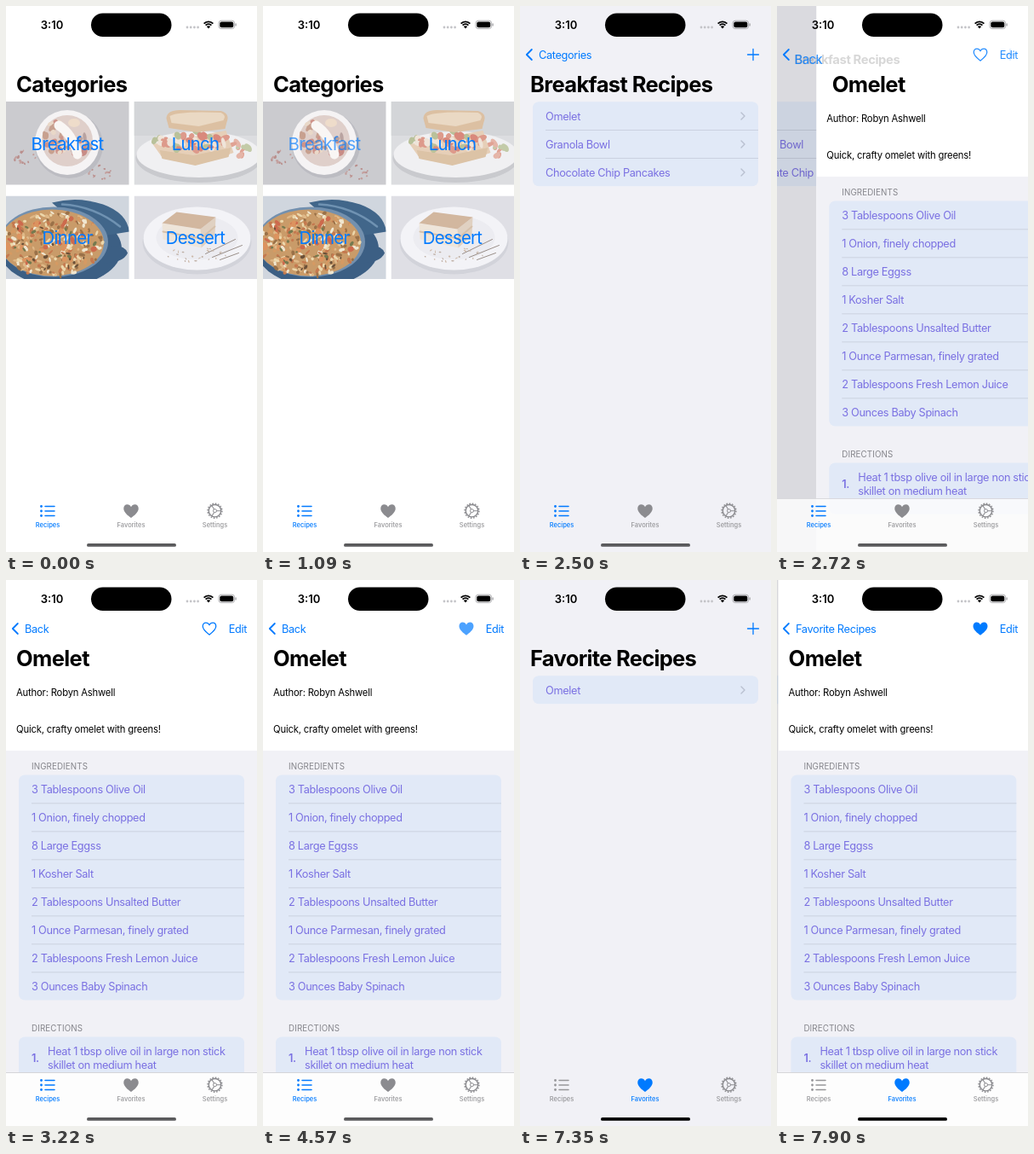
Write an HTML page with a canvas that moves like this. It is 295 by 640 pixels and loops after 8 s.

```html
<!DOCTYPE html>
<html lang="en">
<head>
<meta charset="utf-8">
<title>Recipe app</title>
<style>
html, body { margin: 0; width: 100%; height: 100%; overflow: hidden; background: #fff; }
canvas { display: block; }
</style>
</head>
<body>
<canvas id="stage" width="295" height="640"></canvas>
<script>
const c = document.getElementById('stage').getContext('2d');
const W = 295, H = 640, LOOP = 8000;
const BLUE = '#007aff', GREY = '#969699', PURPLE = '#7a70e2', PAPER = '#f1f1f6', CELL = '#e1e9f7';
const mix = (a, b, p) => a + (b - a) * p;

// ---- drawing helpers ----
function text(s, x, y, size, color, { weight = 400, align = 'left', track = -0.027 } = {}) {
  c.font = `${weight} ${size}px Inter, sans-serif`;
  c.letterSpacing = track * size + 'px';
  c.textAlign = align;
  c.fillStyle = color;
  c.fillText(s, x, y + size * 0.364);
}
function rect(x, y, w, h, color, radius = 0) {
  c.fillStyle = color;
  c.beginPath();
  c.roundRect(x, y, w, h, radius);
  c.fill();
}
function oval(x, y, rx, ry, color, turn = 0) {
  c.fillStyle = color;
  c.beginPath();
  c.ellipse(x, y, rx, ry, turn, 0, 7);
  c.fill();
}
function shape(d, color) {
  c.fillStyle = color;
  c.fill(new Path2D(d));
}
function line(d, color, width) {
  c.strokeStyle = color;
  c.lineWidth = width;
  c.lineCap = c.lineJoin = 'round';
  c.stroke(new Path2D(d));
}
function faded(alpha, draw) {
  if (alpha <= 0) return;
  c.save();
  c.globalAlpha *= Math.min(1, alpha);
  draw();
  c.restore();
}
function shifted(x, y, draw) {
  c.save();
  c.translate(x, y);
  draw();
  c.restore();
}
function random(seed) {
  return () => (seed = seed * 16807 % 2147483647) / 2147483647;
}
// Scatters small ovals inside an ellipse.
function scatter(seed, count, x, y, rx, ry, size, colors) {
  const rnd = random(seed);
  for (let i = 0; i < count; i++) {
    const a = rnd() * 6.283, r = Math.sqrt(rnd());
    oval(x + Math.cos(a) * r * rx, y + Math.sin(a) * r * ry,
      size * (0.6 + rnd()), size * (0.4 + rnd() * 0.5), colors[i % colors.length], rnd() * 3);
  }
}

// ---- food tiles, each 144.5 x 97.5 ----
function breakfast() {
  rect(0, 0, 145, 98, '#cbcbcf');
  scatter(7, 16, 22, 66, 13, 9, 1.6, ['#c3a09e', '#b98f8d']);
  scatter(17, 14, 112, 83, 15, 9, 1.6, ['#c3a09e', '#b98f8d']);
  oval(74, 51, 40, 39, '#bcbcc2');
  oval(72, 48, 38, 38, '#f5f3f4');
  oval(72, 46, 30, 30, '#dfcfca');
  scatter(31, 24, 61, 42, 16, 20, 4, ['#ce938a', '#e9d8c8', '#c7a08f']);
  scatter(41, 12, 88, 54, 10, 14, 4, ['#c88c86', '#b9a3a0']);
  line('M62 28Q78 38 84 62', '#f9f6f4', 11);
  oval(80, 25, 7, 5, '#eedcca');
}
function lunch() {
  rect(0, 0, 145, 98, '#dcdde0');
  rect(0, 0, 145, 40, '#d3d5d8');
  oval(76, 66, 74, 29, '#c9cace');
  oval(76, 62, 73, 27, '#f0f0f2');
  scatter(9, 12, 122, 56, 15, 8, 4, ['#e0a294', '#c3cba8', '#e5b5a8']);
  shape('M22 50L108 34L117 60L88 70L32 64Z', '#e6cfb8');
  scatter(5, 46, 68, 46, 46, 11, 4.5, ['#dd9a8b', '#efe4d9', '#b9c19a', '#d9897c']);
  shape('M38 20Q38 10 54 10L102 11Q113 14 109 24L107 32L74 36L41 31Z', '#dcc0a2');
  shape('M42 17Q52 11 102 13Q109 16 105 22L76 29L44 25Z', '#ead9c4');
  shape('M30 57L70 63L114 54L111 65L72 75L33 67Z', '#dcc3a6');
}
function dinner() {
  rect(0, 0, 145, 98, '#d0d6de');
  oval(64, 62, 72, 44, '#3c5f84');
  shape('M54 8Q84 0 114 10Q142 20 145 42L120 46L72 24Z', '#41668a');
  line('M66 10Q104 12 134 36', '#6f92b2', 2.5);
  shape('M112 60Q139 55 143 67Q138 79 112 79Z', '#3c5f84');
  oval(56, 54, 64, 41, '#7390ae');
  oval(54, 55, 61, 39, '#c99b69');
  scatter(11, 260, 54, 56, 60, 38, 2.4, ['#dfb887', '#c5794f', '#ecd7ab', '#9a7148', '#d59a63', '#f0e6cf']);
  scatter(23, 24, 54, 55, 54, 32, 3.8, ['#cd6a4d', '#dc935f']);
  scatter(37, 30, 54, 56, 54, 33, 2, ['#757a4f', '#6a5038']);
}
function dessert() {
  rect(0, 0, 145, 98, '#dfdfe5');
  oval(74, 54, 64, 38, '#d2d3da');
  oval(74, 50, 63, 37, '#f3f3f7');
  oval(74, 49, 48, 26, '#ececf1');
  shape('M33 32L78 39L79 61L34 51Z', '#eee5da');
  shape('M78 39L96 25L95 46L79 61Z', '#e0d1c2');
  shape('M33 32L50 19L96 25L78 39Z', '#d2b79f');
  line('M34 42L79 50L95 36', '#d6c1ac', 2);
  line('M84 68L119 51M92 72L127 58M101 75L123 67', '#9a8f89', 1);
  scatter(53, 22, 72, 70, 36, 10, 1.2, ['#bdaea3', '#cdbaab']);
}
function tile(x, y, label, draw, strength = 1) {
  shifted(x, y, () => {
    c.beginPath();
    c.rect(0, 0, 144.5, 97.5);
    c.clip();
    draw();
    faded(strength, () => text(label, 72, 49.2, 20.4, BLUE, { align: 'center', track: -0.036 }));
  });
}

// ---- pages ----
function list(y, rows, arrows) {
  rect(15, y, 265, rows.length * 33, CELL, 7);
  rows.forEach((row, i) => {
    const mid = y + 33 * i + 16.8;
    text(row, 30, mid, 12.75, PURPLE);
    if (i) rect(30, y + 33 * i, 250, 0.7, '#c3cad8');
    if (arrows) line(`M260 ${mid - 4}l4 4l-4 4`, '#b9c0d0', 1.4);
  });
}
function recipe() {
  rect(0, 200, W, H, PAPER);
  const note = (s, y) => text(s, 12, y, 11.25, '#000', { track: -0.016 });
  note('Author: Robyn Ashwell', 131.5);
  note('Quick, crafty omelet with greens!', 175);
  const caption = (s, y) => text(s, 30, y, 9.75, '#85858b', { track: 0.012 });
  caption('INGREDIENTS', 218.5);
  list(228.5, ['3 Tablespoons Olive Oil', '1 Onion, finely chopped', '8 Large Eggss', '1 Kosher Salt',
    '2 Tablespoons Unsalted Butter', '1 Ounce Parmesan, finely grated',
    '2 Tablespoons Fresh Lemon Juice', '3 Ounces Baby Spinach']);
  caption('DIRECTIONS', 525);
  rect(15, 535.5, 265, 60, CELL, 7);
  text('1.', 30, 560, 12.75, PURPLE, { weight: 600 });
  text('Heat 1 tbsp olive oil in large non stick', 49, 552, 12.75, PURPLE);
  text('skillet on medium heat', 49, 568, 12.75, PURPLE);
}
const categories = {
  title: 'Categories', paper: '#fff',
  body(t) {
    tile(0, 112, 'Breakfast', breakfast, t < 1090 ? 1 : 0.65);
    tile(150.5, 112, 'Lunch', lunch);
    tile(0, 222.5, 'Dinner', dinner);
    tile(150.5, 222.5, 'Dessert', dessert);
  }
};
const recipes = {
  title: 'Breakfast Recipes', back: 'Categories', paper: PAPER, buttons: plus,
  body: () => list(112.3, ['Omelet', 'Granola Bowl', 'Chocolate Chip Pancakes'], true)
};
const favorites = {
  title: 'Favorite Recipes', paper: PAPER, buttons: plus,
  body: () => list(112.3, ['Omelet'], true)
};
const omelet = { title: 'Omelet', back: 'Back', paper: '#fff', bar: true, buttons: likeAndEdit, body: recipe };
const likedOmelet = { ...omelet, back: 'Favorite Recipes' };

// ---- icons and bars ----
const HEART = new Path2D('M0 .46C-.2 .31-.5 .1-.5-.17C-.5-.34-.39-.44-.26-.44C-.14-.44-.05-.37 0-.27' +
  'C.05-.37 .14-.44 .26-.44C.39-.44 .5-.34 .5-.17C.5 .1 .2 .31 0 .46Z');
function heart(x, y, size, color, filled = true) {
  shifted(x, y, () => {
    c.scale(size, size);
    c.fillStyle = c.strokeStyle = color;
    c.lineWidth = 1.3 / size;
    c.lineJoin = 'round';
    filled ? c.fill(HEART) : c.stroke(HEART);
  });
}
function plus() {
  line('M267.5 57h13M274 50.5v13', BLUE, 1.3);
}
function likeAndEdit(t) {
  const liked = t >= 4450;
  const pressed = t >= 4230 && t < 4670;
  faded(!pressed ? 1 : liked ? 0.7 : 0.4, () => heart(239, 57, liked ? 17 : 15.5, BLUE, liked));
  text('Edit', 283, 57, 12.75, BLUE, { align: 'right' });
}
function gear(x, y, color) {
  c.strokeStyle = color;
  const ring = (r, width) => {
    c.lineWidth = width;
    c.beginPath();
    c.arc(x, y, r, 0, Math.PI * 2);
    c.stroke();
  };
  c.lineCap = 'butt';
  const tooth = Math.PI * 2 * 8.5 / 32;
  c.setLineDash([tooth, tooth]);
  ring(8.5, 1.4);
  c.setLineDash([]);
  ring(7.2, 1.4);
  ring(2, 1);
  line(`M${x + 2} ${y}h5M${x - 1} ${y - 2}l-2.5 -4M${x - 1} ${y + 2}l-2.5 4`, color, 1.1);
}
function tabBar(t, solid) {
  faded(solid, () => {
    rect(0, 577, W, 63, '#fdfdfd');
    rect(0, 577, W, 0.7, '#c9c9cc');
  });
  const onFavorites = t >= 6140;
  const tint = on => on ? BLUE : GREY;
  for (const y of [586.5, 592, 597.5]) {
    oval(41.5, y, 1.4, 1.4, tint(!onFavorites));
    line(`M46 ${y}h11`, tint(!onFavorites), 1.5);
  }
  heart(147, 592, 17.5, onFavorites ? BLUE : '#8b8b8f');
  gear(245.5, 591.7, '#8b8b8f');
  const label = (s, x, color) => text(s, x, 608.2, 7.5, color, { weight: 500, align: 'center', track: 0 });
  label('Recipes', 49, tint(!onFavorites));
  label('Favorites', 147, tint(onFavorites));
  label('Settings', 245.5, GREY);
  rect(95, 630, 105, 3.8, onFavorites ? '#000' : '#5a5a5c', 2);
}
function statusBar() {
  text('3:10', 54, 22, 13, '#000', { weight: 600, align: 'center', track: 0 });
  rect(100, 8.5, 94.5, 27.5, '#000', 13.75);
  for (let i = 0; i < 4; i++) oval(213 + i * 4.2, 25, 1.4, 1.4, '#c4c4c8');
  c.strokeStyle = '#000';
  c.lineWidth = 1.9;
  c.lineCap = 'butt';
  for (const r of [7.6, 4.8]) {
    c.beginPath();
    c.arc(238, 26, r, -Math.PI * 0.75, -Math.PI * 0.25);
    c.stroke();
  }
  shape('M238 26.5l-2.2-2.4q2.2-1.6 4.4 0Z', '#000');
  c.strokeStyle = '#9a9a9d';
  c.lineWidth = 0.8;
  c.beginPath();
  c.roundRect(250, 17.2, 18.6, 9.4, 3);
  c.stroke();
  rect(251.3, 18.5, 16, 6.8, '#000', 2);
  rect(269.5, 20.3, 1.2, 3.2, '#9a9a9d', 1);
}
// The old large title shrinks into the back button of the new page.
function shrinkingTitle(from, to, p) {
  const x = mix(12, 22, p), y = mix(91.5, 57, p) + 4 * p * (1 - p), size = mix(25.5, 12.75, p);
  const bold = { weight: 700, track: -0.024 };
  if (from?.title === to.back) {
    const tint = Math.min(1, p * 1.3);
    const weight = Math.round(mix(7, 4, p)) * 100;
    faded(1 - 1.3 * p * (1 - p), () =>
      text(to.back, x, y, size, `rgb(0,${122 * tint},${255 * tint})`, { weight }));
  } else {
    if (from) faded(1 - p, () => text(from.title, x, y, size, '#000', bold));
    faded(p, () => text(to.back, x, y, size, BLUE));
  }
  faded(from?.back ? 1 : p * 5 - 4, () => line('M13.8 51l-6 6l6 6', BLUE, 1.8));
}
function navBar(from, to, p, offset, t) {
  if (from) {
    faded(1 - p, () => from.buttons?.(t));
    if (from.back) faded(1 - 2 * p, () => text(from.back, 22 - 60 * p, 57, 12.75, BLUE));
  }
  faded(p, () => to.buttons?.(t));
  text(to.title, 12 + offset * 1.14, 91.5, 25.5, '#000', { weight: 700, track: -0.024 });
  if (to.back) shrinkingTitle(from, to, p);
}

function page(view, x, t) {
  shifted(x, 0, () => {
    rect(0, 0, W, H, view.paper);
    view.body(t);
  });
}
function scene(t, to, from, p = 1) {
  const offset = W * (1 - p);
  if (from) {
    page(from, -0.3 * W * p, t);
    rect(0, 0, W, H, `rgba(0,0,0,${0.11 * p})`);
  }
  page(to, offset, t);
  navBar(from, to, p, offset, t);
  tabBar(t, to.bar ? p : 0);
  statusBar();
}

// Critically damped spring, shown in a few held steps.
function spring(t, start, end, steps, delay) {
  const step = (end - start) / (steps - 1);
  const held = step * Math.min(steps - 1, Math.floor((t - start) / step + 1e-6));
  const x = Math.max(0, held - delay) * 0.017;
  return 1 - (1 + x) * Math.exp(-x);
}
function draw(t) {
  if (t < 1090) scene(t, categories);
  else if (t < 1860) scene(t, recipes, categories, spring(t, 1090, 1630, 6, 55));
  else if (t < 2500) scene(t, recipes);
  else if (t < 3220) scene(t, omelet, recipes, spring(t, 2500, 2930, 5, 20));
  else if (t < 6140) scene(t, omelet);
  else if (t < 7350) scene(t, favorites);
  else scene(t, likedOmelet, favorites, spring(t, 7350, 7900, 6, 110));
}
const begin = performance.now();
function tick() {
  draw((performance.now() - begin) % LOOP);
  requestAnimationFrame(tick);
}
tick();
</script>
</body>
</html>
```
